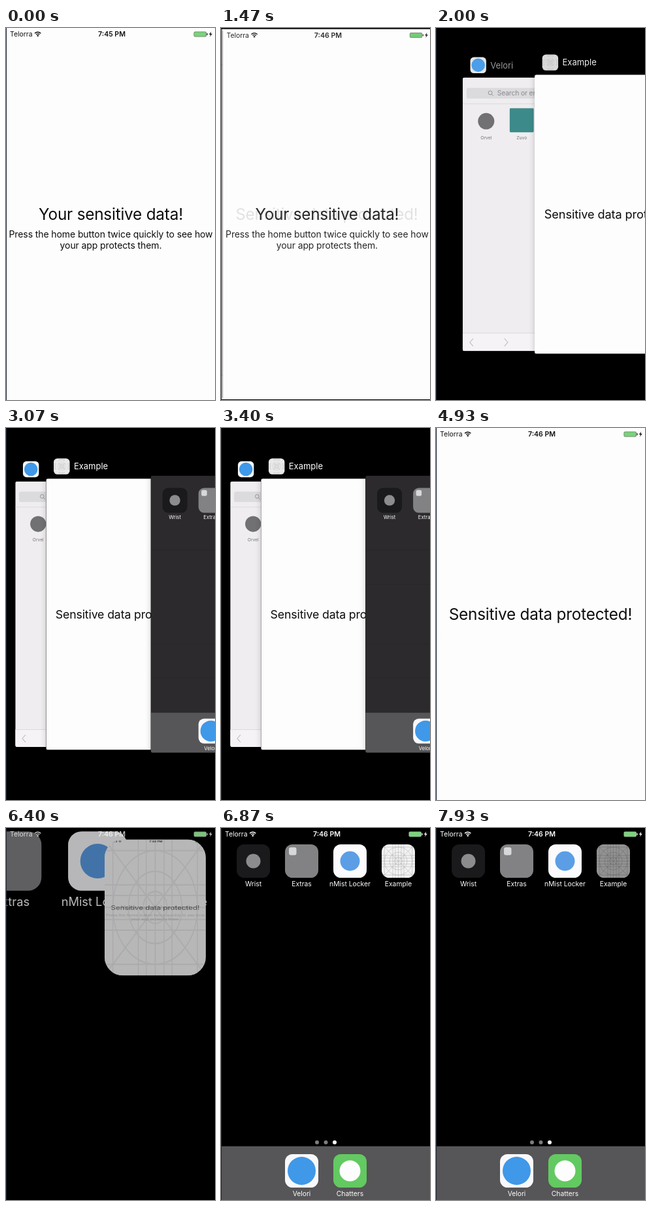
An HTML page with a canvas that plays this animation: 320x568 px, repeating every 8000 ms.

```html
<!DOCTYPE html>
<html lang="en">
<head>
<meta charset="utf-8">
<title>App switcher privacy demo</title>
<style>
html, body { margin: 0; width: 100%; height: 100%; overflow: hidden; background: #000; }
canvas { display: block; width: 320px; height: 568px; }
</style>
</head>
<body>
<canvas id="stage"></canvas>
<script>
const W = 320, H = 568, LOOP = 8000, TILE = 51;
const canvas = document.getElementById('stage');
const ratio = window.devicePixelRatio || 1;
canvas.width = W * ratio;
canvas.height = H * ratio;
const ctx = canvas.getContext('2d');

const clamp = v => Math.max(0, Math.min(1, v));
const lerp = (a, b, k) => a + (b - a) * k;
const ramp = (t, from, to) => clamp((t - from) / (to - from));
const smooth = k => k * k * (3 - 2 * k);
const spring = ms => ms <= 0 ? 0 : 1 - (1 + ms * 0.0092) * Math.exp(-ms * 0.0092);

function layer(alpha, draw) {
  if (alpha <= 0) return;
  ctx.save();
  ctx.globalAlpha *= alpha;
  draw();
  ctx.restore();
}

function rect(x, y, w, h, fill, r = 0) {
  ctx.fillStyle = fill;
  ctx.beginPath();
  ctx.roundRect(x, y, w, h, r);
  ctx.fill();
}

function disc(x, y, r, fill) {
  ctx.fillStyle = fill;
  ctx.beginPath();
  ctx.arc(x, y, r, 0, 7);
  ctx.fill();
}

function path(points, stroke, width) {
  ctx.strokeStyle = stroke;
  ctx.lineWidth = width;
  ctx.beginPath();
  points.forEach(([x, y]) => ctx.lineTo(x, y));
  ctx.stroke();
}

function text(str, x, y, size, fill, { align = 'center', weight = 400, track = 0 } = {}) {
  ctx.font = `${weight} ${size}px Inter, "Liberation Sans", sans-serif`;
  ctx.letterSpacing = track + 'px';
  ctx.textAlign = align;
  ctx.fillStyle = fill;
  ctx.fillText(str, x, y);
}

// ---- status bar ----

function statusBar(t, color) {
  text('Telorra', 6, 13.3, 10.4, color, { align: 'left' });
  ctx.strokeStyle = color;
  ctx.lineWidth = 1.4;
  for (const r of [3.7, 6.4]) {
    ctx.beginPath();
    ctx.arc(48.7, 12.6, r, -Math.PI * 0.76, -Math.PI * 0.24);
    ctx.stroke();
  }
  disc(48.7, 11.8, 1.3, color);

  const flip = ramp(t, 410, 730);
  const clock = { weight: 600 };
  layer(1 - flip, () => text('7:45 PM', 162, 13.3, 10.6, color, clock));
  layer(flip, () => text('7:46 PM', 162, 13.3, 10.6, color, clock));

  rect(287.5, 5.5, 19.5, 8, color === '#fff' ? '#a9b7a9' : '#667066', 2);
  rect(288.2, 6.2, 18, 6.6, '#78d47a', 1.4);
  rect(307.5, 8, 1.2, 3, color, 0.6);
  ctx.fillStyle = color;
  ctx.beginPath();
  [[314.2, 5.5], [310.8, 10], [313, 10], [312, 13.5], [315.8, 8.8], [313.5, 8.8]]
    .forEach(([x, y]) => ctx.lineTo(x, y));
  ctx.fill();
}

// ---- app screens ----

function appScreen(t, guarded, barAlpha) {
  const ink = '#0c0c0c', title = { track: -0.2 }, body = { track: -0.1 };
  rect(0, 0, W, H, '#fefdfe');
  layer(1 - guarded, () => {
    text('Your sensitive data!', 160.5, 293, 24.3, ink, title);
    text('Press the home button twice quickly to see how', 160.5, 320, 14, ink, body);
    text('your app protects them.', 160.5, 337, 14, ink, body);
  });
  layer(guarded, () => text('Sensitive data protected!', 160, 293, 24.3, ink, title));
  layer(barAlpha, () => statusBar(t, '#111'));
}

function browserScreen() {
  rect(0, 0, W, H, '#efedef');
  rect(8, 22, 304, 22, '#dbdadd', 4);
  ctx.strokeStyle = '#8b8a8f';
  ctx.lineWidth = 1.2;
  ctx.beginPath();
  ctx.arc(57.5, 32, 4, 0, 7);
  ctx.stroke();
  path([[60.5, 35], [64, 38.5]], '#8b8a8f', 1.2);
  text('Search or enter website name', 72, 38, 14, '#8b8a8f', { align: 'left', track: -0.15 });
  rect(0, 54.5, W, 1, '#d3d2d6');
  disc(49, 91, 17, '#717073');
  rect(98, 64, 50, 50, '#3d8a8a', 2);
  text('Orvel', 49, 128, 9.3, '#77767a');
  text('Zuvo', 123, 128, 9.3, '#77767a');
  rect(0, 531, W, 37, '#f5f3f5');
  rect(0, 530.5, W, 1, '#d3d2d6');
  path([[22, 542], [15, 550], [22, 558]], '#bfbec3', 1.5);
  path([[87, 542], [94, 550], [87, 558]], '#bfbec3', 1.5);
}

// ---- icons, all on a 51 unit tile ----

function browserIcon() {
  rect(0, 0, TILE, TILE, '#f8f8fa', 11.5);
  disc(25.5, 25.5, 21.5, '#3f98e8');
}

function gridIcon(r = 11.5) {
  const line = '#a8a8aa';
  rect(0, 0, TILE, TILE, '#f3f2f3', r);
  ctx.save();
  ctx.beginPath();
  ctx.roundRect(0, 0, TILE, TILE, r);
  ctx.clip();
  for (const p of [4.2, 17, 21, 25.5, 30, 34, 46.8]) {
    path([[p, 0], [p, TILE]], line, 0.5);
    path([[0, p], [TILE, p]], line, 0.5);
  }
  path([[0, 0], [TILE, TILE]], line, 0.5);
  path([[TILE, 0], [0, TILE]], line, 0.5);
  for (const c of [6, 13.5, 21.3]) {
    ctx.beginPath();
    ctx.arc(25.5, 25.5, c, 0, 7);
    ctx.stroke();
  }
  ctx.restore();
}

function watchIcon() {
  rect(0, 0, TILE, TILE, '#1a1a1c', 11.5);
  disc(25.5, 25.5, 11, '#8c8c8f');
}

function folderIcon() {
  rect(0, 0, TILE, TILE, '#828183', 11.5);
  rect(6, 4.5, 11.5, 12, '#d6d8da', 3);
}

function driveIcon() {
  rect(0, 0, TILE, TILE, '#fbfbfd', 11.5);
  disc(25.5, 25.5, 15, '#5b9ee6');
}

function chatIcon() {
  rect(0, 0, TILE, TILE, '#63c961', 11.5);
  disc(25.5, 25.5, 16, '#fdfdfd');
}

function icon(draw, x, y, scale = 1) {
  ctx.save();
  ctx.translate(x, y);
  ctx.scale(scale, scale);
  draw();
  ctx.restore();
}

// ---- home screen ----

const apps = [
  [watchIcon, 'Wrist', 24, 25], [folderIcon, 'Extras', 98, 25],
  [driveIcon, 'nMist Locker', 172, 25], [gridIcon, 'Example', 246, 25],
  [browserIcon, 'Velori', 98, 498], [chatIcon, 'Chatters', 172, 498]
];

function homeIcons(hideExample) {
  rect(0, 486, W, 82, '#565557');
  [147, 160.5, 174].forEach((x, i) => disc(x, 480, 3, i === 2 ? '#fff' : '#7d7d7f'));
  for (const [draw, name, x, y] of apps) {
    if (!(hideExample && draw === gridIcon)) icon(draw, x, y);
    text(name, x + 25.5, y + 64.3, 10.3, '#fff');
  }
}

function homeCard() {
  rect(0, 0, W, H, '#2c2a2c');
  for (const y of [152, 222, 345, 414]) rect(0, y, W, 1, '#272628');
  homeIcons(false);
}

// ---- app switcher ----

// Deck position: each card's x + SHIFT is STEP times that of the card below it.
const STEP = 3.4, SHIFT = 5.4;
const swipe = [[2290, 162.4], [2950, 68], [3200, 65.5], [3900, 71.4]];

function deckAt(t) {
  if (t <= swipe[0][0]) return swipe[0][1];
  for (let i = 1; i < swipe.length; i++) {
    const [t0, a] = swipe[i - 1], [t1, b] = swipe[i];
    if (t < t1) return a * Math.pow(b / a, smooth(ramp(t, t0, t1)));
  }
  return swipe[swipe.length - 1][1];
}

function restPose(deck, index) {
  const k = deck * Math.pow(STEP, index);
  return { x: k - SHIFT, s: 0.7137 + 0.0126 * (Math.log(k) - 2.965) };
}

function card(pose, draw) {
  const { x, s } = pose;
  const y = (H - H * s) / 2 + 0.3;
  ctx.save();
  ctx.shadowColor = 'rgba(0,0,0,0.2)';
  ctx.shadowBlur = 10 * ratio;
  rect(x, y, W * s, H * s, '#000', 3);
  ctx.restore();
  ctx.save();
  ctx.beginPath();
  ctx.roundRect(x, y, W * s, H * s, s > 0.99 ? 0 : 3);
  ctx.clip();
  ctx.translate(x, y);
  ctx.scale(s, s);
  draw();
  ctx.restore();
}

function cardTitle(pose, draw, name, alpha, nameAlpha) {
  const y = (H - H * pose.s) / 2 - 18.3;
  layer(alpha, () => {
    icon(draw, pose.x + 11.7, y - 12.2, 24.4 / TILE);
    layer(nameAlpha, () => text(name, pose.x + 42.5, y + 4.8, 13, '#fff', { align: 'left' }));
  });
}

function switcher(t) {
  const open = t < 4040 ? spring(t - 1450) : 1 - spring(t - 4040);
  const deck = deckAt(t);
  const pose = (index, fromX) => {
    const rest = restPose(deck, index);
    return { x: lerp(fromX, rest.x, open), s: lerp(1, rest.s, open) };
  };
  const back = pose(-1, 0), mid = pose(0, 0), front = pose(1, 340);
  const titles = clamp(open * 2 - 1);
  const gap = mid.x - back.x;

  card(back, browserScreen);
  cardTitle(back, browserIcon, 'Velori', titles, clamp((gap - 47) / 98));
  const guarded = ramp(t, 1440, 1720);
  const bar = t < 4040 ? 1 - guarded : ramp(t, 4450, 4750);
  card(mid, () => appScreen(t, guarded, bar));
  cardTitle(mid, gridIcon, 'Example', titles, 1);
  if (front.x < W) card(front, homeCard);
}

// ---- closing to the home screen ----

function closing(t) {
  const e = smooth(ramp(t, 5940, 6740));
  const cx = 271.5, cy = 50.5;
  const zoom = lerp(3, 1, e);

  layer(clamp(e * 2), () => {
    ctx.save();
    ctx.translate(cx, cy);
    ctx.scale(zoom, zoom);
    ctx.translate(-cx, -cy);
    homeIcons(true);
    ctx.restore();
  });

  const ev = Math.pow(e, 0.74);
  const w = lerp(W, TILE, e), h = lerp(H, TILE, ev);
  const x = lerp(160, cx, e) - w / 2, y = lerp(284, cy, ev) - h / 2;
  const r = Math.min(e * 46, w * 0.225);
  ctx.save();
  ctx.beginPath();
  ctx.roundRect(x, y, w, h, r);
  ctx.clip();
  ctx.translate(x, y);
  ctx.save();
  ctx.scale(w / TILE, h / TILE);
  gridIcon(0);
  ctx.restore();
  layer(clamp((1 - e) * 2), () => {
    ctx.scale(w / W, h / H);
    appScreen(t, ramp(t, 5930, 6560), 1);
  });
  ctx.restore();

  layer(0.29 * Math.sin(Math.PI * e), () => rect(0, 0, W, H, '#000'));
  layer(clamp(e * 1.25), () => statusBar(t, '#fff'));
  layer(0.4 * ramp(t, 7640, 7760), () => rect(246, 25, TILE, TILE, '#000', 11.5));
}

function render(t) {
  ctx.setTransform(ratio, 0, 0, ratio, 0, 0);
  ctx.globalAlpha = 1;
  rect(0, 0, W, H, '#000');
  if (t < 1450) appScreen(t, 0, 1);
  else if (t < 4900) switcher(t);
  else if (t < 5930) appScreen(t, 1 - ramp(t, 4930, 5130), 1);
  else closing(t);
  rect(0, 0, 1, H, '#1b2433');
}

const start = performance.now();
function tick() {
  render((performance.now() - start) % LOOP);
  requestAnimationFrame(tick);
}
tick();
</script>
</body>
</html>
```
